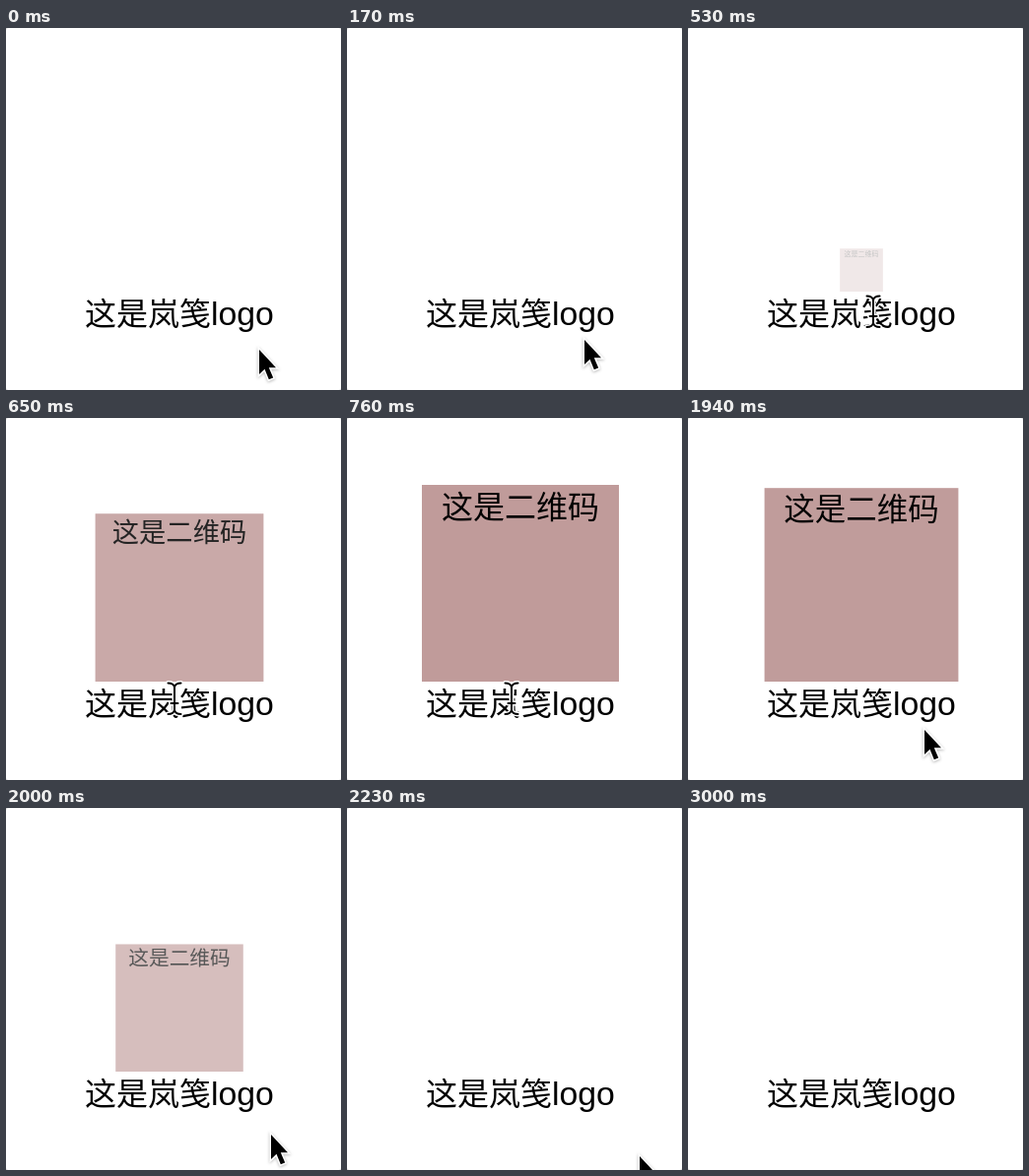
Animation, 340 px wide and 368 px high, one loop 4700 ms. Source, as an HTML page:

```html
<!DOCTYPE html>
<html lang="zh-CN">
<head>
<meta charset="utf-8">
<title>悬停展开</title>
<style>
  html, body { margin: 0; width: 100%; height: 100%; overflow: hidden; background: #fff; }
  svg { display: block; width: 100vw; height: 100vh; }
  .cjk { font: 32px "Noto Sans CJK SC", "Noto Sans CJK", sans-serif; }
  .latin { font: 33.8px "Liberation Sans", Arial, sans-serif; }
  #arrow { filter: drop-shadow(0 1.5px 1.5px rgba(0, 0, 0, .28)); }
</style>
</head>
<body>
<svg viewBox="0 0 340 368">
  <rect width="340" height="368" fill="#d4d4d4"/>
  <rect width="340" height="368" rx="2.5" fill="#fff"/>
  <g id="card">
    <rect x="76" y="68" width="200" height="200" fill="#c09b9a"/>
    <text class="cjk" x="96" y="101.7">这是二维码</text>
  </g>
  <text class="cjk" x="80" y="301.7">这是岚笺</text>
  <text class="latin" x="208" y="301.7">logo</text>
  <g id="arrow">
    <path d="M0 1V26L5.5 20.8L9.8 31.2L14.2 29.4L9.8 19.2H17Z" stroke="#fff" stroke-width="3" paint-order="stroke"/>
  </g>
  <g id="beam" fill="none" stroke-linecap="round">
    <path id="bar" d="M-6.5-15.5Q-1-15.5 0-11.5Q1-15.5 6.5-15.5M0-11.5V12M-6.5 16Q-1 16 0 12Q1 16 6.5 16M-3.5 5H3.5"/>
    <use href="#bar" stroke="#fff" stroke-width="5"/>
    <use href="#bar" stroke="#000" stroke-width="2"/>
  </g>
</svg>
<script>
const LOOP = 4700, STEP = 58.75, FADE = 300, ENTER = 479, LEAVE = 1930;
const $ = id => document.getElementById(id);
const card = $('card'), arrow = $('arrow'), beam = $('beam');

// pointer stops: step, kind, x, y
const stops = [
  [0, 'arrow', 257, 326], [1, 'arrow', 249, 320], [2, 'arrow', 243, 317], [3, 'arrow', 241, 316],
  [8, 'beam', 216, 297], [9, 'beam', 188, 288], [10, 'beam', 177, 286], [11, 'beam', 171, 285],
  [12, 'beam', 168, 285], [13, 'beam', 167, 285],
  [31, 'beam', 169, 285], [32, 'beam', 188, 291],
  [33, 'arrow', 240, 316], [34, 'arrow', 269, 331], [35, 'arrow', 282, 341],
  [36, 'arrow', 290, 347], [37, 'arrow', 295, 351], [38, 'arrow', 297, 353],
  [51, 'none', 0, 0]
];

const bezier = (a, b, s) => 3 * a * s * (1 - s) ** 2 + 3 * b * s * s * (1 - s) + s ** 3;

// cubic-bezier(.25, .1, .25, 1)
function ease(x) {
  if (x <= 0) return 0;
  if (x >= 1) return 1;
  let lo = 0, hi = 1;
  for (let i = 0; i < 24; i++) {
    const mid = (lo + hi) / 2;
    if (bezier(.25, .25, mid) < x) lo = mid; else hi = mid;
  }
  return bezier(.1, 1, lo);
}

function draw(ms) {
  const step = Math.floor((ms % LOOP + 7) / STEP);
  const t = step * STEP;

  // the last sliver of the transition counts as finished
  let k = ease((t - ENTER) / FADE) - ease((t - LEAVE) / FADE);
  if (k > .994) k = 1;
  if (k < .006) k = 0;
  card.setAttribute('visibility', k ? 'visible' : 'hidden');
  card.setAttribute('opacity', k);
  card.setAttribute('transform', `translate(176 268) scale(${k}) translate(-176 -268)`);

  const [, kind, x, y] = stops.filter(s => s[0] <= step).pop();
  for (const el of [arrow, beam]) {
    el.setAttribute('visibility', el.id === kind ? 'visible' : 'hidden');
    el.setAttribute('transform', `translate(${x} ${y})`);
  }
}

const start = performance.now();
function tick() {
  draw(performance.now() - start);
  requestAnimationFrame(tick);
}
tick();
</script>
</body>
</html>
```
